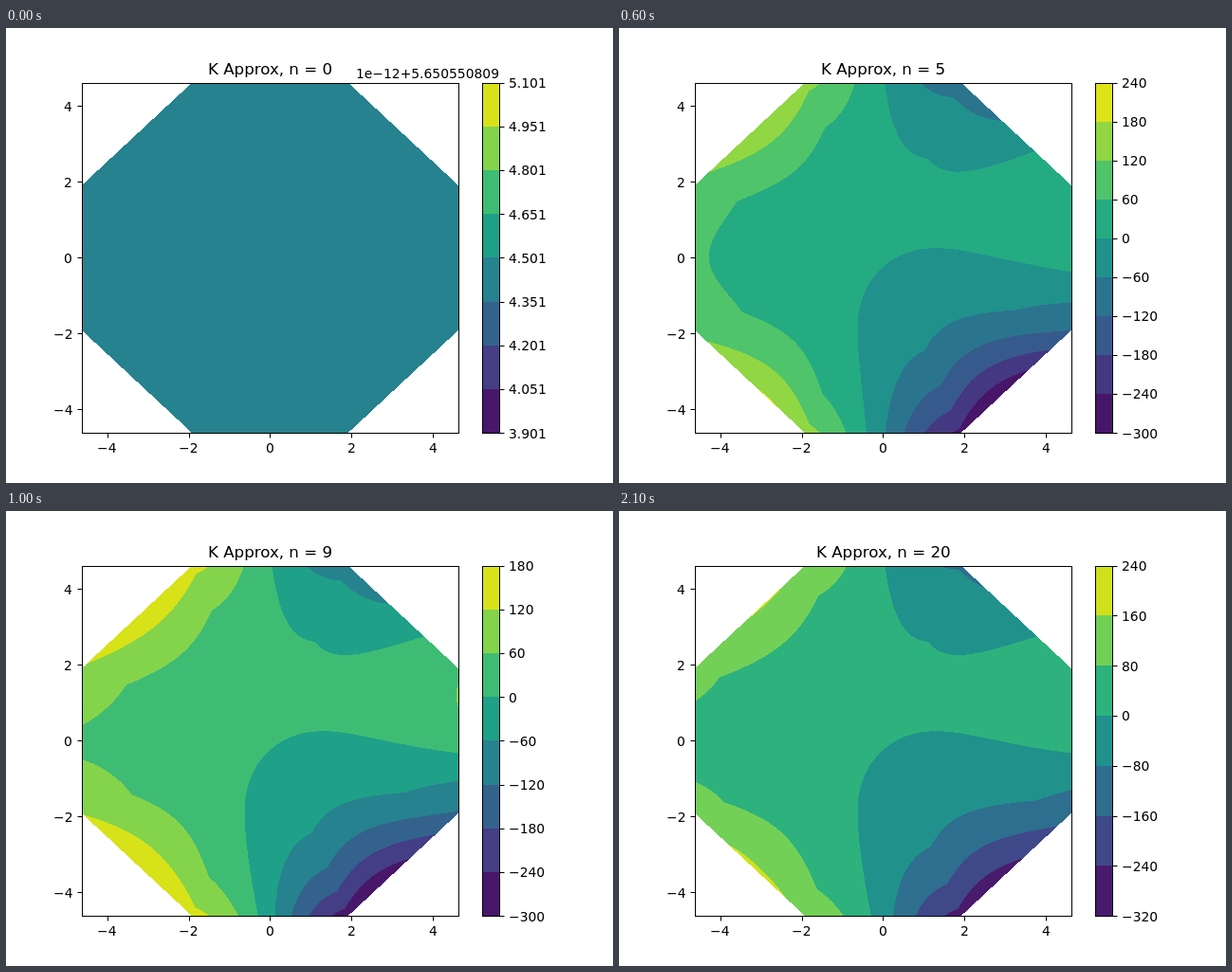
An HTML page with a canvas that plays this animation: 640x480 px, repeating every 2.2 s.

```html
<!DOCTYPE html>
<html lang="en">
<head>
<meta charset="utf-8">
<title>K Approx</title>
<style>
  html, body { margin: 0; width: 100%; height: 100%; overflow: hidden; background: #fff; }
  canvas { display: block; }
</style>
</head>
<body>
<canvas id="stage" width="640" height="480"></canvas>
<script>
const ctx = document.getElementById('stage').getContext('2d');
const CX = 278.4, CY = 242.4, HALF_W = 198.4, HALF_H = 184.8, APOTHEM = 4.6194;
const LEFT = 80, TOP = 58, COLS = 397, ROWS = 369;

const palettes = {
  7: ['#481b6d', '#3f4889', '#2e6e8e', '#21918c', '#2db27d', '#73d056', '#d0e11c'],
  8: ['#481769', '#433e85', '#33638d', '#26828e', '#1fa088', '#3fbc73', '#84d44b', '#d8e219'],
  9: ['#481668', '#453882', '#375a8c', '#2b748e', '#21918c', '#25ab82', '#50c46a', '#90d743', '#dde318']
};

// Harmonics: [order n that adds it, frequency, radial power, cosine, sine]
const harmonics = [
  [1, 1, 1, -91, 42],
  [2, 2, 2, 35, 60],
  [3, 1, 1, 59, -4],
  [3, 0, 3.2, 8, 0],
  [3, 1, 3.2, -93, 15],
  [3, 3, 3.2, 110, 24],
  [5, 5, 5, -8, -1],
  [6, 6, 6, -6, 4],
  [7, 7, 7, 7, 5]
];

// First level, spacing and number of colour bands
function scaleFor(n) {
  if (n === 0) return {lo: 3.901, step: 0.15, bins: 8};
  if (n === 1) return {lo: -120, step: 30, bins: 8};
  if (n === 2) return {lo: -160, step: 40, bins: 8};
  if (n >= 17) return {lo: -320, step: 80, bins: 7};
  return {lo: -300, step: 60, bins: n > 6 && n < 11 ? 8 : 9};
}

// rho is the octagon's own radius: 0 at the centre, 1 on its rim.
function field(n, rho, angle) {
  if (n === 0) return 4.4;
  let sum = 2;
  for (const [order, k, power, a, b] of harmonics) {
    if (order <= n) sum += rho ** power * (a * Math.cos(k * angle) + b * Math.sin(k * angle));
  }
  return sum;
}

function drawField(n, {lo, step, bins}) {
  const colors = palettes[bins].map(c => parseInt(c.slice(1), 16));
  const image = ctx.createImageData(COLS, ROWS);
  for (let row = 0, i = 0; row < ROWS; row++) {
    for (let col = 0; col < COLS; col++, i += 4) {
      const x = (LEFT + col + 0.5 - CX) / HALF_W, y = (CY - TOP - row - 0.5) / HALF_H;
      const u = Math.abs(x), v = Math.abs(y);
      const rho = Math.max(u, v, (u + v) * Math.SQRT1_2);
      if (rho > 1) continue;
      const band = Math.floor((field(n, rho, Math.atan2(y, x)) - lo) / step);
      const color = colors[Math.min(bins - 1, Math.max(0, band))];
      image.data.set([color >> 16, color >> 8 & 255, color & 255, 255], i);
    }
  }
  ctx.putImageData(image, LEFT, TOP);
}

const snap = v => Math.round(v) + 0.5;

function line(x1, y1, x2, y2) {
  ctx.beginPath();
  ctx.moveTo(x1, y1);
  ctx.lineTo(x2, y2);
  ctx.stroke();
}

// anchor: 0 left, 0.5 centre, 1 right; text starts on whole pixels.
function text(value, x, y, anchor, size = 13.889) {
  const s = String(value).replace(/-/g, '\u2212');
  ctx.font = size + 'px "DejaVu Sans", sans-serif';
  ctx.fillStyle = '#000';
  ctx.fillText(s, Math.round(x - anchor * ctx.measureText(s).width), Math.round(y));
}

function drawAxes() {
  ctx.strokeRect(80.5, 58.5, 397, 369);
  for (let v = -4; v <= 4; v += 2) {
    const x = CX + v * HALF_W / APOTHEM, y = CY - v * HALF_H / APOTHEM;
    line(snap(x), 428, snap(x), 432.5);
    line(75.5, snap(y), 80, snap(y));
    text(v, x, 448, 0.5);
    text(v, 70.3, y + 5.3, 1);
  }
}

function drawBar({lo, step, bins}) {
  const edge = i => CY + HALF_H * (1 - 2 * i / bins);
  palettes[bins].forEach((color, i) => {
    const top = Math.round(edge(i + 1));
    ctx.fillStyle = color;
    ctx.fillRect(502, top, 18.5, Math.round(edge(i)) - top);
  });
  ctx.strokeRect(502.5, 58.5, 18, 369);
  for (let i = 0; i <= bins; i++) {
    const value = lo + step * i;
    line(521, snap(edge(i)), 525.5, snap(edge(i)));
    text(step < 1 ? value.toFixed(3) : value, 529.8, edge(i) + 5.3, 0);
  }
}

function draw(n) {
  const scale = scaleFor(n);
  ctx.clearRect(0, 0, 640, 480);
  ctx.strokeStyle = '#000';
  ctx.lineWidth = 1;
  drawField(n, scale);
  drawAxes();
  drawBar(scale);
  text('K Approx, n = ' + n, CX, 49, 0.5, 16.667);
  if (n === 0) text('1e-12+5.650550809', 520, 53, 1);
}

const start = performance.now();
let shown = -1;
function tick() {
  const t = (performance.now() - start) % 2200;
  const n = Math.max(0, Math.floor(t / 100) - 1);
  if (n !== shown) draw(shown = n);
  requestAnimationFrame(tick);
}
tick();
</script>
</body>
</html>
```
